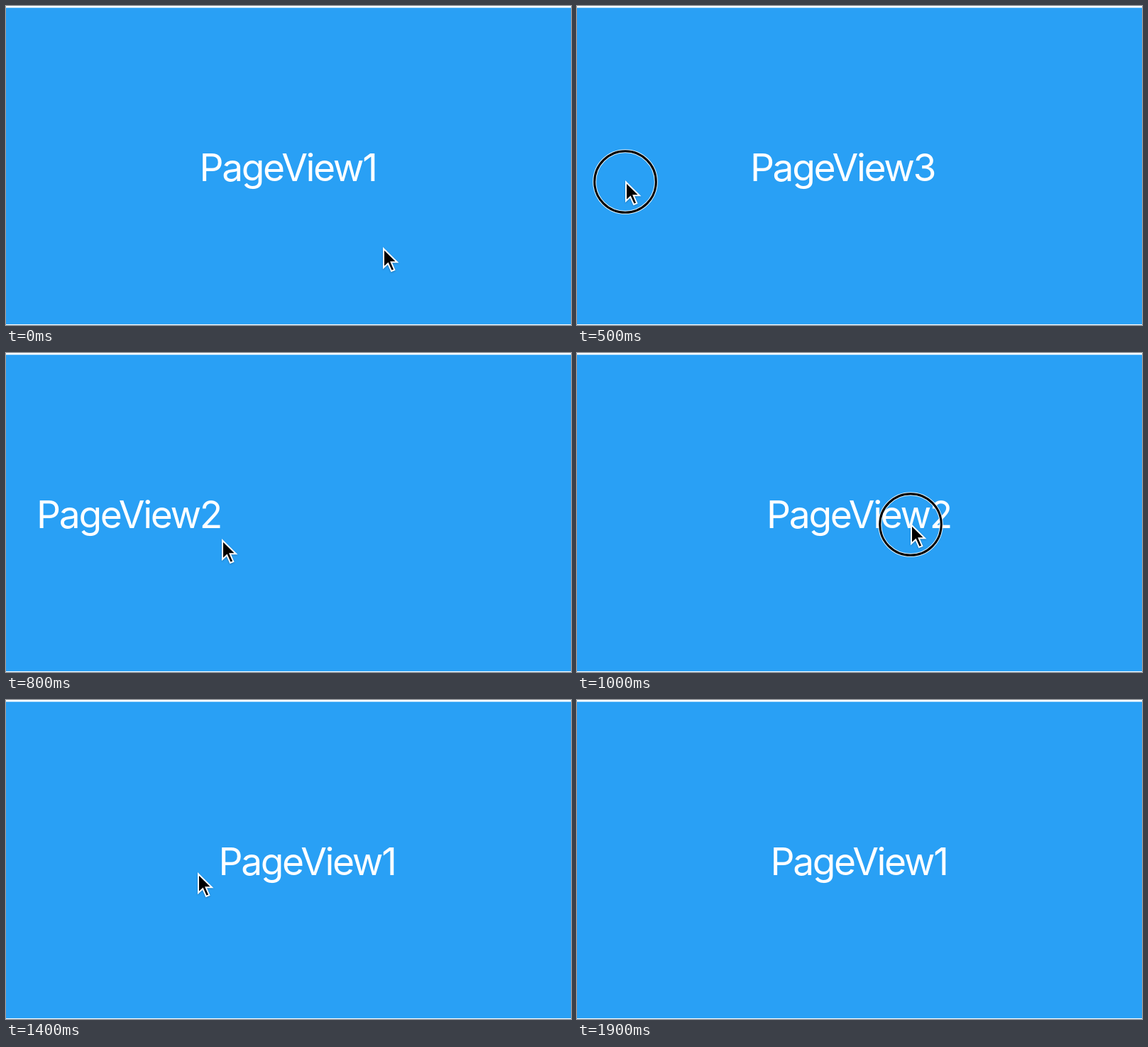
Recreate the animation shown at these times as an HTML page. Size 796 px wide and 450 px high, loop 2000 ms.

```html
<!DOCTYPE html>
<html lang="en">
<head>
<meta charset="utf-8">
<title>Page swipe</title>
<style>
  html, body { margin: 0; width: 100%; height: 100%; overflow: hidden; background: #fff; }
  svg { display: block; width: 796px; height: 450px; }
  text { font: 380 53.3px Inter, Roboto, sans-serif; letter-spacing: -2.35px; text-anchor: middle; fill: #fff; }
  #arrow { filter: drop-shadow(0 1px 1px rgba(0, 0, 0, .25)); }
</style>
</head>
<body>
<svg viewBox="0 0 796 450">
  <rect y="2.5" width="796" height="446.5" fill="#29a0f5"/>
  <g id="pages">
    <text x="397" y="247">PageView1</text>
    <text x="1193" y="247">PageView2</text>
    <text x="1989" y="247">PageView3</text>
  </g>
  <g id="cursor">
    <g id="ring" fill="none">
      <circle cy="2" r="43.3" stroke="#fff" stroke-opacity=".85" stroke-width="5"/>
      <circle cy="2" r="43.3" stroke="#000" stroke-width="3"/>
    </g>
    <path id="arrow" d="M1 2.5V29L7.2 23.2L12 34L16.3 32.2L11.6 21.3H20Z" stroke="#fff" stroke-width="2"/>
  </g>
</svg>
<script>
  const LOOP = 2000, STEP = 100, PAGE = 796, EXIT = 1900;

  // Turning points of the gesture; "held" keeps the button down until the next one.
  const poses = [
    { at: 0, scroll: 0, x: 531, y: 340 },
    { at: 300, scroll: PAGE - 6, x: 565, y: 267, held: true },
    { at: 500, scroll: 2 * PAGE + 23, x: 68, y: 246, held: true },
    { at: 800, scroll: PAGE + 224, x: 304, y: 262 },
    { at: 1000, scroll: PAGE, x: 470, y: 240, held: true },
    { at: 1200, scroll: PAGE + 124, x: 224, y: 210 },
    { at: 1400, scroll: -27, x: 270, y: 243 },
    { at: 1500, scroll: 0, x: 203, y: 183 },
    { at: 1800, scroll: 0, x: 4, y: 4 }
  ];

  const pages = document.getElementById('pages');
  const cursor = document.getElementById('cursor');
  const ring = document.getElementById('ring');

  const smooth = p => p * p * (3 - 2 * p);
  const mix = (a, b, p) => a + (b - a) * p;
  const show = (node, on) => { node.style.display = on ? '' : 'none'; };
  const move = (node, x, y) => node.setAttribute('transform', `translate(${x} ${y})`);

  function draw(now) {
    const time = Math.floor((now % LOOP) / STEP) * STEP;
    const index = poses.findLastIndex(pose => pose.at <= time);
    const from = poses[index], to = poses[index + 1] ?? from;
    const part = to === from ? 0 : (time - from.at) / (to.at - from.at);

    move(pages, -mix(from.scroll, to.scroll, smooth(part)), 0);
    move(cursor, mix(from.x, to.x, part), mix(from.y, to.y, part));
    show(cursor, time < EXIT);
    show(ring, from.held);
  }

  let start;
  function frame(now) {
    start ??= now;
    draw(now - start);
    requestAnimationFrame(frame);
  }
  draw(0);
  requestAnimationFrame(frame);
</script>
</body>
</html>
```
